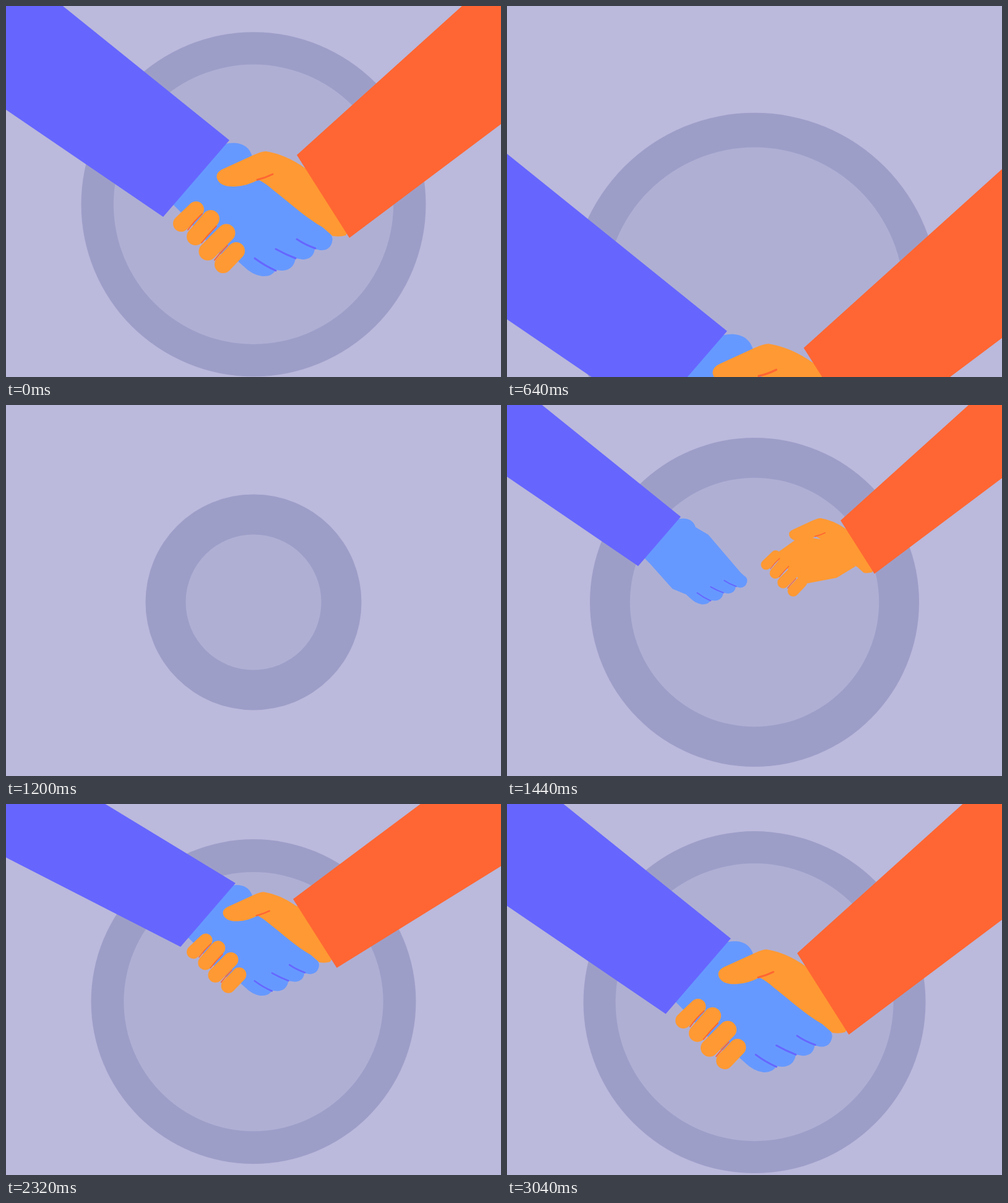
An HTML page with a canvas that plays this animation: 800x600 px, repeating every 3120 ms.

```html
<!DOCTYPE html>
<html lang="en">
<head>
<meta charset="utf-8">
<title>Handshake</title>
<style>
html, body { margin: 0; width: 100%; height: 100%; overflow: hidden; background: #bbb9dc; }
canvas { display: block; }
</style>
</head>
<body>
<canvas id="stage" width="800" height="600"></canvas>
<script>
const ctx = document.getElementById('stage').getContext('2d');
const LOOP = 3120, STEP = 80, EXIT_END = 1040;

const BLUE = '#6699ff', INDIGO = '#6666ff', ORANGE = '#ff9933', RED = '#ff6633';

const blueHand = new Path2D(`M345 226 C362 219 390 217 398 243 L430 262 L512 358 L520 365
  Q530 371 527 382 Q523 396 508 395 L499 393 Q497 409 480 410 L468 408
  Q465 427 446 428 L436 427 Q430 438 414 437 Q398 435 384 421 L374 412
  L340 398 L284 335 L268 319 Z`);
const blueCreases = new Path2D(`M402 408 Q418 420 436 428 M436 393 Q452 402 468 408
  M470 377 Q483 386 500 392`);
const orangePalm = new Path2D('M300 330 L370 280 L430 290 L508 356 L460 385 L380 400 Z');
const orangeThumb = new Path2D(`M483 262 Q452 240 420 235 Q413 235 400 241 L352 263
  Q338 269 341 279 Q346 293 370 292 Q390 291 408 281 Q420 287 431 297
  C458 318 485 343 512 358 Q521 366 528 372 Q540 374 549 371 L556 360 L505 268 Z`);
const orangeCreases = new Path2D(`M317 336 Q304 348 294 362 M340 356 Q327 369 316 383
  M358 387 Q347 398 337 411`);
const thumbCrease = new Path2D('M406 281 Q419 278 431 272');
const fingers = [
  [307, 329, 283, 352, 26], [331, 344, 306, 373, 28],
  [356, 367, 326, 397, 29], [372, 396, 351, 418, 28]
];

const outCubic = p => 1 - (1 - p) ** 3;
const inOut = p => 0.5 - 0.5 * Math.cos(Math.PI * p);

// Keys are [time, value]; the first span uses its own easing.
function track(t, keys, firstEase = inOut) {
  if (t <= keys[0][0]) return keys[0][1];
  for (let i = 1; i < keys.length; i++) {
    const [t0, a] = keys[i - 1], [t1, b] = keys[i];
    if (t < t1) return a + (b - a) * (i === 1 ? firstEase : inOut)((t - t0) / (t1 - t0));
  }
  return keys[keys.length - 1][1];
}

function disc(y, r, color) {
  ctx.fillStyle = color;
  ctx.beginPath();
  ctx.arc(400, y, Math.max(0, r), 0, 2 * Math.PI);
  ctx.fill();
}

function fill(path, color) {
  ctx.fillStyle = color;
  ctx.fill(path);
}

function stroke(path, color, width) {
  ctx.strokeStyle = color;
  ctx.lineWidth = width;
  ctx.stroke(path);
}

function quad(color, ...points) {
  ctx.fillStyle = color;
  ctx.beginPath();
  points.forEach(p => ctx.lineTo(...p));
  ctx.fill();
}

function shifted(x, y, draw) {
  ctx.save();
  ctx.translate(x, y);
  draw();
  ctx.restore();
}

function drawRing(t, u, leaving) {
  const base = 278.5 + 25.4 * u + 6.7 * u * u;
  const y = 300 + 0.0745 * base + (leaving ? 148 * (t / 640) ** 2.93 : 0);
  const outer = leaving ? 1
    : track(t, [[1040, 0], [1590, 1.066], [1880, 0.985], [2240, 1]], outCubic);
  const inner = leaving ? 1
    : track(t, [[1060, 0], [1743, 1.066], [2000, 0.975], [2800, 1]], outCubic);
  disc(y, base * outer, '#9d9ec8');
  disc(y, base * 0.812 * inner, '#afafd4');
}

function drawArms(t, u, leaving) {
  const zoom = 1 + 0.212 * u;
  const drop = leaving ? 320 * (t / 640) ** 2.4 : 0;
  const lift = leaving ? 0 : track(t, [[1520, 0], [2320, 125], [3080, 0]]);
  const apart = leaving ? 0 : track(t, [[1240, 900], [1680, 0]], outCubic);
  const pull = Math.min(1, lift / 60);
  const blueAt = [-apart, -0.7 * apart], orangeAt = [apart, -0.8 * apart];

  ctx.save();
  ctx.translate(400, 300 + drop);
  ctx.scale(zoom, zoom);
  ctx.translate(-400, -300);
  ctx.lineCap = 'round';

  if (apart > 0) shifted(orangeAt[0], orangeAt[1] - lift, () => fill(orangePalm, ORANGE));

  shifted(blueAt[0], blueAt[1] - lift, () => {
    fill(blueHand, BLUE);
    stroke(blueCreases, INDIGO, 3);
  });

  shifted(orangeAt[0], orangeAt[1] - lift, () => {
    fill(orangeThumb, ORANGE);
    stroke(thumbCrease, RED, 3);
    for (const [x0, y0, x1, y1, width] of fingers) {
      stroke(new Path2D(`M${x0} ${y0}L${x1} ${y1}`), ORANGE, width);
    }
    stroke(orangeCreases, RED, 2);
  });

  // Cuffs follow the hands while the shoulders stay put.
  shifted(...blueAt, () => {
    const dx = 4 * pull, dy = pull - lift;
    quad(INDIGO, [361 + dx, 217 + dy], [254 + dx, 341 + dy], [-486, -164], [-279, -299]);
  });
  shifted(...orangeAt, () => {
    const dx = 7 * pull, dy = 8 * pull - lift;
    quad(RED, [470 + dx, 241 + dy], [555 + dx, 375 + dy], [1415, -271], [1190, -409]);
  });
  ctx.restore();
}

function draw(now) {
  const t = Math.floor((now % LOOP) / STEP) * STEP;
  const leaving = t < EXIT_END;
  const u = (leaving ? t : t - LOOP) / 1000;
  ctx.fillStyle = '#bbb9dc';
  ctx.fillRect(0, 0, 800, 600);
  drawRing(t, u, leaving);
  if (leaving || t > 1240) drawArms(t, u, leaving);
}

const start = performance.now();
function frame() {
  draw(performance.now() - start);
  requestAnimationFrame(frame);
}
frame();
</script>
</body>
</html>
```
